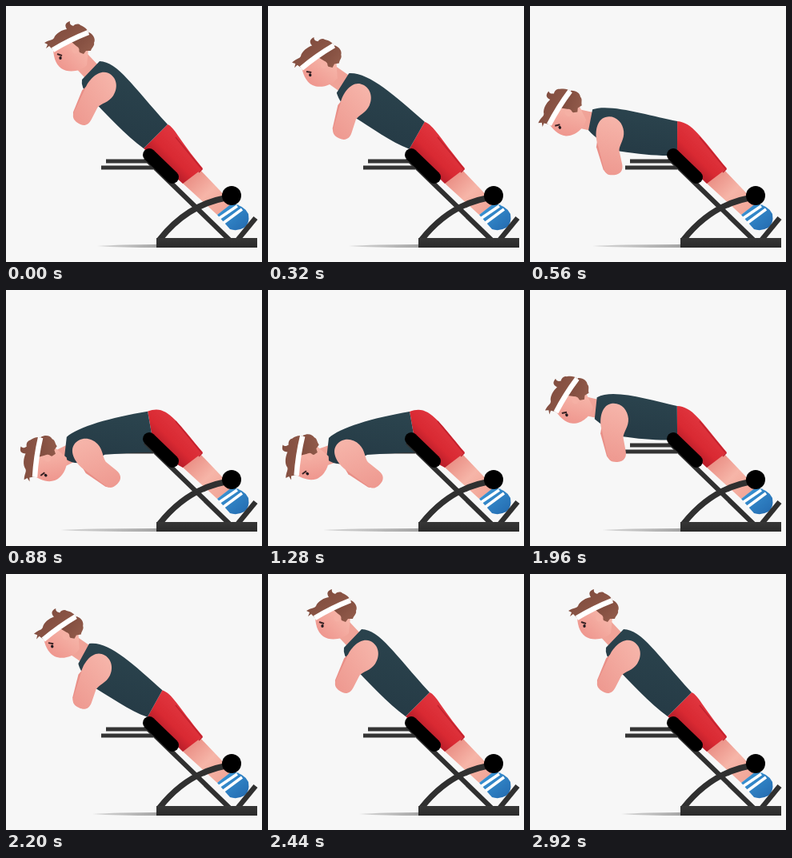
An HTML page that plays this animation: 320 px wide and 320 px high, repeating every 3000 ms.

```html
<!DOCTYPE html>
<html lang="en">
<head>
<meta charset="utf-8">
<title>Back extension</title>
<style>
  html, body { margin: 0; width: 100%; height: 100%; overflow: hidden; background: #f7f7f7; }
  svg { display: block; width: 100%; height: 100%; }
</style>
</head>
<body>
<svg viewBox="0 0 320 320" fill="none">
  <defs>
    <linearGradient id="shirtFill" x1=".7" y1="0" x2=".4" y2="1">
      <stop offset="0" stop-color="#2b444e"/><stop offset="1" stop-color="#253a45"/>
    </linearGradient>
    <linearGradient id="shortsFill" gradientUnits="userSpaceOnUse" x1="222" y1="172" x2="196" y2="198">
      <stop offset="0" stop-color="#df343d"/><stop offset=".6" stop-color="#d92932"/><stop offset="1" stop-color="#b81d2a"/>
    </linearGradient>
    <linearGradient id="shinFill" gradientUnits="userSpaceOnUse" x1="232" y1="214" x2="272" y2="254">
      <stop offset="0" stop-color="#eb9288"/><stop offset=".5" stop-color="#f6b5a8"/><stop offset="1" stop-color="#f2a799"/>
    </linearGradient>
    <linearGradient id="armFill" x1=".6" y1="0" x2=".4" y2="1">
      <stop offset="0" stop-color="#f6b5aa"/><stop offset="1" stop-color="#ee9990"/>
    </linearGradient>
    <linearGradient id="faceFill" x1=".8" y1=".2" x2=".1" y2=".9">
      <stop offset="0" stop-color="#f7b9ac"/><stop offset="1" stop-color="#ee948c"/>
    </linearGradient>
    <linearGradient id="hairFill" x1="0" y1="0" x2="1" y2="1">
      <stop offset="0" stop-color="#7a4639"/><stop offset="1" stop-color="#965f4e"/>
    </linearGradient>
    <linearGradient id="shoeFill" x1="0" y1="0" x2="1" y2="1">
      <stop offset="0" stop-color="#3c9ad9"/><stop offset="1" stop-color="#2369ae"/>
    </linearGradient>
    <linearGradient id="baseFill" x1="0" y1="0" x2="0" y2="1">
      <stop offset="0" stop-color="#373737"/><stop offset="1" stop-color="#2a2a2a"/>
    </linearGradient>
    <linearGradient id="shadowFill">
      <stop offset="0" stop-color="#d8d8d8"/><stop offset="1" stop-color="#a4a4a4"/>
    </linearGradient>
  </defs>

  <path id="shadow" fill="url(#shadowFill)"/>
  <path d="M125 194H180M119 202H184" stroke="#343434" stroke-width="5"/>

  <!-- lower leg and shoe -->
  <path d="M218 219L242 204L283 247L264 261Z" fill="url(#shinFill)"/>
  <path d="M264 261L282 247Q298 249 303 260Q305 272 298 277Q289 282 280 279Z" fill="url(#shoeFill)"/>
  <path d="M267 265L289 250M272 271L295 254" stroke="#fff" stroke-width="3.6"/>

  <path id="shorts" fill="url(#shortsFill)"/>
  <path d="M212 164L245 204L241 208" stroke="#c3222e" stroke-width="1.6"/>
  <line id="neck" stroke="#f0a398" stroke-width="23" stroke-linecap="round"/>
  <path id="shirt" fill="url(#shirtFill)"/>

  <g id="head">
    <path d="M59 52C59 61 61 72 69 78C78 84 93 82 101 74L104 44L80 36Z" fill="url(#faceFill)"/>
    <path d="M82 45L104 33C110 36 112 42 110 46C111 50 107 52 106 56L100 56L97 60L92 58L89 51Z" fill="url(#hairFill)"/>
    <circle cx="87" cy="55" r="4.5" fill="#f5b0a4"/>
    <path d="M59 55L54 50L50 53L52 48L48 46C54 42 58 43 60 40C62 34 70 30 76 29C73 24 74 21 80 19C79 23 82 24 84 25C87 22 91 22 93 24C98 26 102 29 103 33Z" fill="url(#hairFill)"/>
    <path d="M58.500 55Q80 42 103 33" stroke="#fff" stroke-width="6.500"/>
    <path d="M64 60L70 62" stroke="#3a2224" stroke-width="2"/>
    <ellipse cx="68" cy="65" rx="1.700" ry="2" fill="#231b20"/>
  </g>

  <g id="arm">
    <path d="M-16 6L-19 18L-13 47Q-10 53 -2 54L-6 10Z" fill="#e98f87"/>
    <path d="M-4 -18C8 -20 17 -10 17 2C17 12 10 18 9 25L11 42C12 50 8 55 0 55C-8 55 -11 52 -12 47L-17 14C-20 2 -16 -16 -4 -18Z" fill="url(#armFill)"/>
  </g>

  <!-- bench -->
  <path d="M174 190L280 293" stroke="#303030" stroke-width="6"/>
  <path d="M192 292Q226 249 274 240" stroke="#303030" stroke-width="7.500"/>
  <path d="M312 265L289 293" stroke="#303030" stroke-width="6.500"/>
  <path d="M188 290H314V302H188Z" fill="url(#baseFill)"/>
  <path d="M179 186L208 214" stroke="#000" stroke-width="16" stroke-linecap="round"/>
  <circle cx="282" cy="237" r="12" fill="#000"/>
</svg>
<script>
const LOOP = 3000;
const LOWER_START = 90, LIFT_START = 1600, MOVE = 840;
const MID = 0.6;

// head and arm: x, y, rotation; back, belly, chest and seat: curve points
const top_ = {
  head: [84, 54, 0], arm: [121, 101, 34], neck: [107, 82], shadow: [114],
  back: [117, 69, 140, 70, 158, 100, 202, 148],
  belly: [172, 178, 150, 162, 125, 135, 104, 113],
  chest: [93, 102, 95, 92], seat: [211, 152, 213, 163]
};
const lowering = {
  head: [45, 135, -32], arm: [100, 157, -6], neck: [81, 146], shadow: [78],
  back: [78, 130, 100, 122, 150, 138, 184, 144],
  belly: [184, 187, 160, 188, 140, 186, 112, 182],
  chest: [85, 170, 73, 156], seat: [203, 146, 212, 162]
};
const low = {
  head: [50, 214, -56], arm: [101, 204, -45], neck: [80, 206], shadow: [68],
  back: [76, 185, 90, 172, 130, 160, 177, 152],
  belly: [186, 203, 165, 203, 145, 205, 124, 206],
  chest: [90, 226, 73, 211], seat: [200, 143, 210, 160]
};
const lowEnd = { ...low, head: [49, 207, -54], neck: [80, 204], shadow: [70] };
const lifting = {
  ...lowering,
  head: [54, 137, -31], arm: [106, 159, -3], neck: [88, 148], shadow: [91],
  back: [84, 133, 105, 122, 150, 137, 184, 145],
  chest: [90, 168, 81, 160]
};

const el = id => document.getElementById(id);
const clamp = v => Math.min(1, Math.max(0, v));
const ease = v => (1 - Math.cos(Math.PI * clamp(v))) / 2;

function blend(poses, weights) {
  const out = {};
  for (const key in poses[0])
    out[key] = poses[0][key].map((_, i) =>
      poses.reduce((sum, pose, n) => sum + pose[key][i] * weights[n], 0));
  return out;
}

// Quadratic through the upright, middle and lowest poses.
function bend(p, middle, lowest) {
  return blend([top_, middle, lowest], [
    (p - MID) * (p - 1) / MID,
    p * (1 - p) / (MID * (1 - MID)),
    p * (p - MID) / (1 - MID)
  ]);
}

function poseAt(t) {
  const bottom = LOWER_START + MOVE;
  if (t < bottom) return bend(ease((t - LOWER_START) / MOVE), lowering, low);
  if (t < LIFT_START) {
    const k = ease((t - bottom) / (LIFT_START - bottom));
    return blend([low, lowEnd], [1 - k, k]);
  }
  return bend(1 - ease((t - LIFT_START) / MOVE), lifting, lowEnd);
}

function place(id, [x, y, angle], origin = "") {
  el(id).setAttribute("transform", `translate(${x} ${y}) rotate(${angle}) ${origin}`);
}

function draw(t) {
  const { head, arm, neck, shadow, back, belly, chest, seat } = poseAt(t);
  const [startX, startY, ...backCurve] = back;
  const [hemX, hemY, ...bellyCurve] = belly;

  el("shirt").setAttribute("d",
    `M${startX} ${startY}C${backCurve}L${hemX} ${hemY}C${bellyCurve}Q${chest}Z`);
  el("shorts").setAttribute("d",
    `M${back.slice(-2)}C${seat} 246 203L221 222L${hemX} ${hemY}Z`);
  el("shadow").setAttribute("d",
    `M${shadow[0]} 300Q${shadow[0] + 30} 298 190 298V302Q${shadow[0] + 30} 302 ${shadow[0]} 300Z`);

  place("head", head, "translate(-84 -54)");
  place("arm", arm);

  const a = head[2] * Math.PI / 180, c = Math.cos(a), s = Math.sin(a);
  const ends = {
    x1: head[0] + 8 * c - 12 * s, y1: head[1] + 8 * s + 12 * c,
    x2: neck[0], y2: neck[1]
  };
  for (const name in ends) el("neck").setAttribute(name, ends[name]);
}

const start = performance.now();
function tick() {
  draw((performance.now() - start) % LOOP);
  requestAnimationFrame(tick);
}
tick();
</script>
</body>
</html>
```
